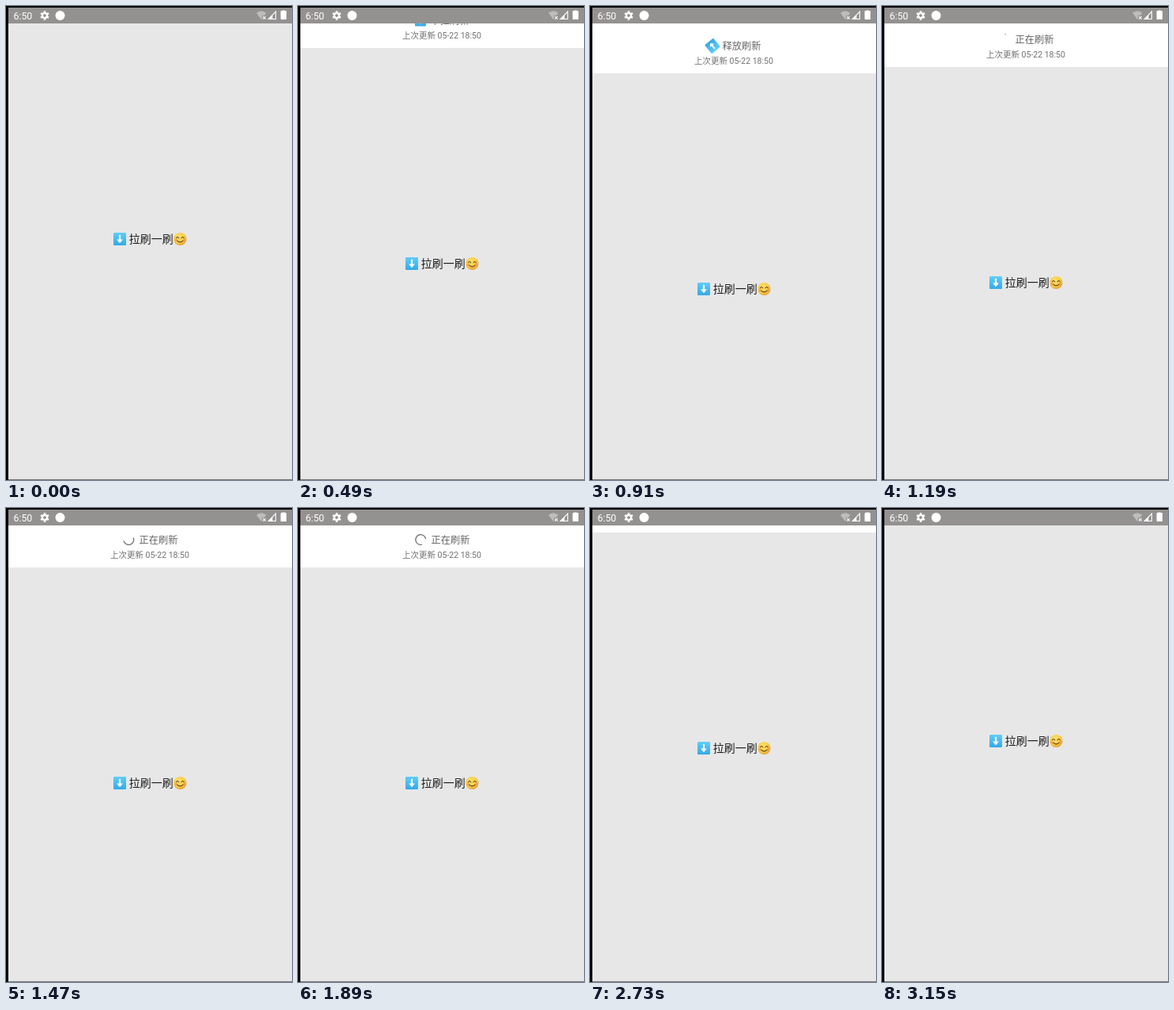
An HTML page that plays this animation: 362 px wide and 598 px high, repeating every 3.22 s.

```html
<!DOCTYPE html>
<html lang="zh-CN">
<head>
<meta charset="utf-8">
<title>下拉刷新</title>
<style>
  html, body { margin: 0; width: 100%; height: 100%; overflow: hidden; background: #000; }
  svg { display: block; }
  text { font-family: Roboto, "Noto Sans CJK SC", "Noto Sans CJK", sans-serif; }
  .time { font-size: 12.3px; fill: #fff; }
  .title { font-size: 12.2px; fill: #666; }
  .note { font-size: 10.5px; fill: #707070; }
  .body { font-size: 14px; fill: #1c1c1c; }
</style>
</head>
<body>
<svg width="362" height="598" viewBox="0 0 362 598">
  <defs>
    <linearGradient id="blue" x1="0" y1="0" x2="0" y2="1">
      <stop offset="0" stop-color="#5fcdf8"/>
      <stop offset="1" stop-color="#36a9e6"/>
    </linearGradient>
    <radialGradient id="gold" cx=".42" cy=".35" r=".68">
      <stop offset="0" stop-color="#fde26c"/>
      <stop offset=".65" stop-color="#f8cb45"/>
      <stop offset="1" stop-color="#e29a2e"/>
    </radialGradient>
    <clipPath id="page"><rect x="3" y="22" width="359" height="575"/></clipPath>
    <g id="down">
      <rect x="-8" y="-8" width="16" height="16" rx="1.2" fill="url(#blue)"/>
      <path d="M-1.1-5.2H1.1V.6H3.9L0 5.2-3.9.6H-1.1Z" fill="#fff"/>
    </g>
  </defs>

  <g clip-path="url(#page)">
    <rect x="3" y="22" width="359" height="576" fill="#fff"/>
    <g id="header">
      <g id="arrow"><use href="#down" transform="scale(.88)"/></g>
      <circle id="spinner" r="6.4" pathLength="1" fill="none" stroke="#777" stroke-width="1.4"/>
      <text id="title" class="title" y="-8.4"></text>
      <text class="note" x="132" y="9.5">上次更新 05-22 18:50</text>
    </g>
    <g id="content">
      <rect x="3" y="22" width="359" height="576" fill="#e7e7e7"/>
      <use href="#down" x="144" y="294"/>
      <text class="body" x="155.7" y="299.2">拉刷一刷</text>
      <g transform="translate(220.4 294)">
        <circle r="8.1" fill="url(#gold)"/>
        <g fill="#ef8a45" opacity=".55">
          <circle cx="-5.2" cy="1.6" r="1.8"/>
          <circle cx="5.2" cy="1.6" r="1.8"/>
        </g>
        <path d="M-5-1.2Q-3.3-3.8-1.6-1.2M1.6-1.2Q3.3-3.8 5-1.2M-3.6 2.2Q0 5.6 3.6 2.2"
              fill="none" stroke="#65401c" stroke-width="1.1" stroke-linecap="round"/>
      </g>
    </g>
  </g>

  <rect x="3" y="2" width="359" height="20" fill="#949191"/>
  <rect x="3" y="597" width="359" height="1" fill="#777"/>
  <text class="time" x="9.5" y="16.6">6:50</text>
  <g transform="translate(49 12)">
    <circle r="3.1" fill="none" stroke="#fff" stroke-width="2.4"/>
    <path id="teeth" fill="none" stroke="#fff" stroke-width="2.6"/>
  </g>
  <circle cx="68.5" cy="12" r="6" fill="#fff"/>
  <path d="M317 8.7Q323.2 3.6 329.4 8.7L327 11.9H324V16L323.2 17Z" fill="#bdbbbb"/>
  <path d="M325.2 13.2 328.6 16.6M328.6 13.2 325.2 16.6" stroke="#fff" stroke-width="1.1"/>
  <path d="M341.4 7.2V16.5H332.2Z" fill="none" stroke="#fff" stroke-width="1.1"/>
  <path d="M337.4 11.4V16.5H332.2Z" fill="#fff"/>
  <path d="M349.7 6V5.4H352.7V6H354.2Q355 6 355 6.8V16.2Q355 17 354.2 17H348.4Q347.6 17 347.6 16.2V6.8Q347.6 6 348.4 6Z" fill="#fff"/>
</svg>
<script>
const LOOP = 3220, TICK = 70;
const RELEASE = 770, REFRESH = 1120, SPIN = 1180, DONE = 2310;
const $ = id => document.getElementById(id);
const clamp = v => Math.max(0, Math.min(1, v));

// Pull distance: [time, pixels]
const pull = [
  [0, 0], [210, 0], [280, 3], [490, 31], [700, 53], [770, 58], [980, 66], [1050, 66],
  [1190, 55], [1330, 53], [2660, 53], [2730, 9]
];

function offset(t) {
  if (t >= 2730) return 9 * (1 - clamp((t - 2730) / 420)) ** 2;
  const i = pull.findIndex(p => p[0] > t);
  const [t0, y0] = pull[i - 1], [t1, y1] = pull[i];
  return y0 + (y1 - y0) * (t - t0) / (t1 - t0);
}

// cubic-bezier(.4, 0, .2, 1)
function ease(x) {
  let lo = 0, hi = 1, s = .5;
  for (let i = 0; i < 20; i++) {
    s = (lo + hi) / 2;
    const bx = 1.2 * s * (1 - s) ** 2 + .6 * s * s * (1 - s) + s ** 3;
    if (bx < x) lo = s; else hi = s;
  }
  return s * s * (3 - 2 * s);
}

function drawSpinner(ms) {
  const u = ms / 1333 % 1;
  const from = .75 * ease(clamp(2 * u - 1));
  const to = .75 * ease(clamp(2 * u));
  const turn = ms / 4444 * 720 + 90 * (ms / 1333) + 360 * from - 90;
  $('spinner').setAttribute('stroke-dasharray', `${to - from + .025} 2`);
  $('spinner').setAttribute('transform', `translate(155.3 -13) rotate(${turn})`);
}

function titleAt(t) {
  if (t < RELEASE) return ['下拉刷新', 167.6];
  if (t < REFRESH) return ['释放刷新', 167.6];
  if (t < DONE) return ['正在刷新', 168.6];
  return ['刷新完成', 158.1];
}

function draw(t) {
  const y = Math.round(offset(t));
  $('content').setAttribute('transform', `translate(0 ${y})`);
  $('header').setAttribute('transform', `translate(0 ${y})`);

  const [label, x] = titleAt(t);
  $('title').textContent = label;
  $('title').setAttribute('x', x);

  const flip = 180 * clamp((t - RELEASE) / 180);
  $('arrow').setAttribute('transform', `translate(155 -12.6) rotate(${flip})`);
  $('arrow').setAttribute('visibility', t < REFRESH ? 'visible' : 'hidden');

  const spinning = t >= SPIN && t < DONE;
  $('spinner').setAttribute('visibility', spinning ? 'visible' : 'hidden');
  if (spinning) drawSpinner(t - SPIN);
}

$('teeth').setAttribute('d', Array.from({ length: 6 }, (_, i) => {
  const a = i * Math.PI / 3 + Math.PI / 6, c = Math.cos(a), s = Math.sin(a);
  return `M${3.6 * c} ${3.6 * s}L${5.7 * c} ${5.7 * s}`;
}).join(''));

const start = performance.now();
function frame() {
  const t = (performance.now() - start) % LOOP;
  draw(Math.floor(t / TICK) * TICK);
  requestAnimationFrame(frame);
}
frame();
</script>
</body>
</html>
```
